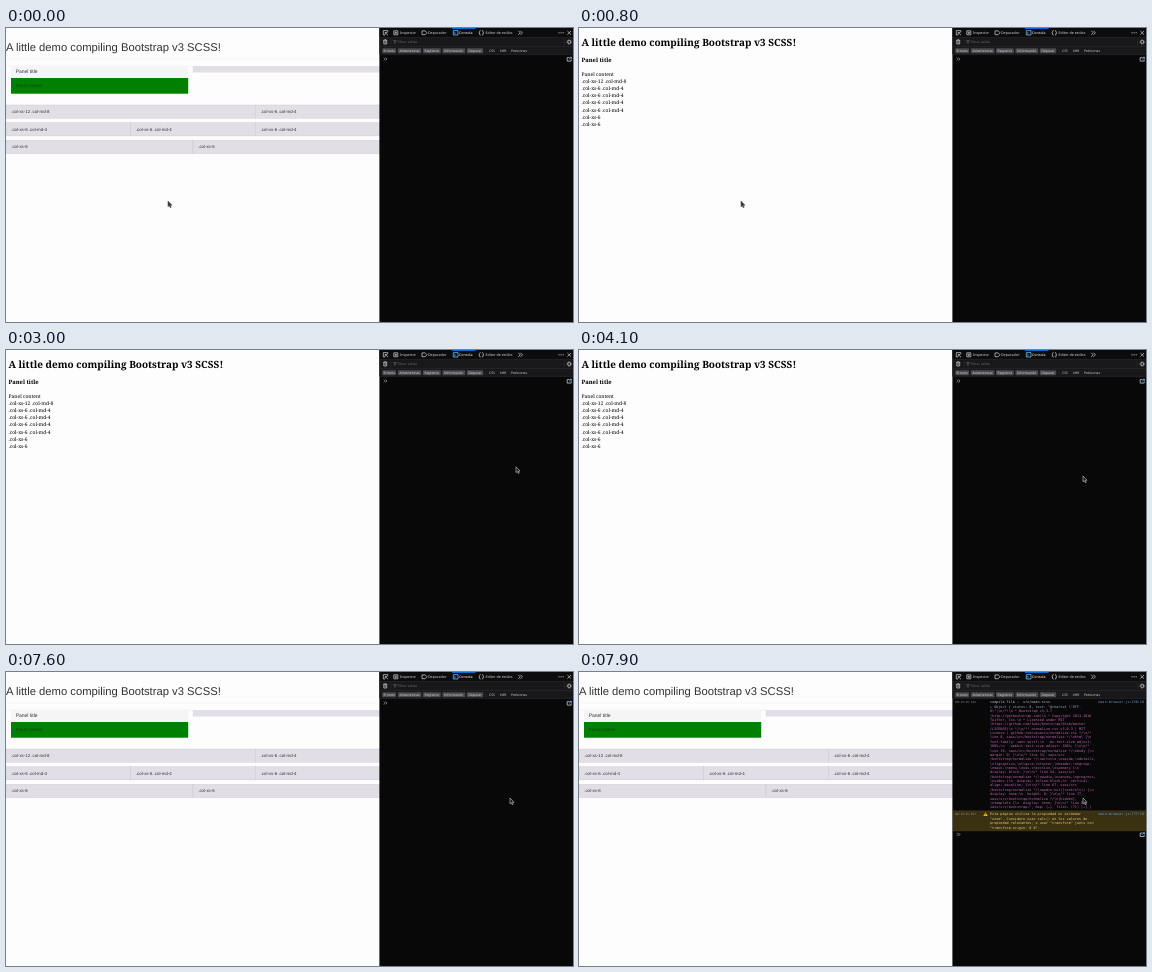
An HTML page that plays this animation: 567 by 294 pixels, repeating every 8000 ms.

```html
<!DOCTYPE html>
<html lang="en">
<head>
<meta charset="utf-8">
<title>SCSS compiling demo</title>
<style>
  html, body { margin: 0; width: 100%; height: 100%; overflow: hidden; background: #fdfdfd; }
  svg { display: block; width: 567px; height: 294px; }
  text { text-rendering: geometricPrecision; white-space: pre; }
  #styled { font: 4.37px "Liberation Sans", Arial, sans-serif; fill: #333; }
  #plain { font: 4.99px "Noto Serif", serif; fill: #000; }
  #tools { font: 3.6px "Noto Sans", sans-serif; fill: #d7d7db; }
  .mono { font: 3.45px "DejaVu Sans Mono", monospace; }
  .stamp { font-size: 2.85px; fill: #939395; }
  .link { fill: #5f9fd8; text-anchor: end; }
  .icon { fill: none; stroke: #c8c8cc; stroke-width: .75; }
  .blue { stroke: #75bfff; }
</style>
</head>
<body>
<svg viewBox="0 0 567 294">
  <rect width="374" height="294" fill="#fdfdfd"/>

  <g id="styled">
    <text x="0" y="22.6" font-size="11.24">A little demo compiling Bootstrap v3 SCSS!</text>
    <path d="M0 31H374" stroke="#eee" stroke-width=".5"/>
    <rect x="187" y="38" width="187" height="6.5" fill="#e1dee6"/>
    <path d="M0 38H187V44.5" fill="none" stroke="#ddd8e2" stroke-width=".4"/>
    <rect x="5" y="38.5" width="177.2" height="11.5" fill="#f5f5f5"/>
    <rect x="5" y="50" width="177.2" height="15.7" fill="#008000"/>
    <text x="9.7" y="45.4" font-size="5">Panel title</text>
    <text x="9.7" y="59.2" fill="#153d15">Panel content</text>
  </g>

  <g id="plain">
    <text x="2.5" y="17.6" font-size="9.98" font-weight="700">A little demo compiling Bootstrap v3 SCSS!</text>
    <text x="2.5" y="34.2" font-size="5.84" font-weight="700">Panel title</text>
  </g>

  <g id="tools">
    <rect x="373.4" width="193.6" height="294" fill="#080809"/>
    <rect x="373.4" width="193.6" height="9.4" fill="#0c0c0d"/>
    <rect x="373.4" y="9.4" width="193.6" height="17.2" fill="#18181a"/>
    <path d="M374 9.4H567M374 18.6H567M374 26.6H567" stroke="#38383d" stroke-width=".4"/>
    <rect x="446" width="23.5" height=".8" fill="#0a84ff"/>

    <g class="icon">
      <path d="M379 7H377.3V2.6H381.8V4.2M379.2 4.4L382 7.2M379.2 4.4V6.6M379.2 4.4H381.4"/>
      <path d="M387.8 2.8H391.8V6.8H387.8ZM389.2 4.2H390.4V5.4H389.2Z"/>
      <path d="M416 2.9H419.2L421 4.8L419.2 6.7H416Z"/>
      <path class="blue" d="M447.3 2.6H452V7H447.3ZM448.3 4.2L449.4 5.2L448.3 6.2"/>
      <path d="M474.6 2.5Q473.6 2.5 473.6 3.6T472.8 4.8Q473.6 4.8 473.6 6T474.6 7.1M476 2.5Q477 2.5 477 3.6T477.8 4.8Q477 4.8 477 6T476 7.1"/>
      <path d="M512.3 2.8L514.2 4.8L512.3 6.8M514.5 2.8L516.4 4.8L514.5 6.8"/>
      <path d="M552.5 4.8H558" stroke-width="1" stroke-dasharray="1 1.1"/>
      <path d="M561.4 3L565 6.6M565 3L561.4 6.6"/>
      <path d="M377.2 12.3H381.2M378.5 11.7H380M377.8 12.3V16H380.7V12.3M379.2 13.2V15.2"/>
      <path d="M387.5 12.5H390.4L389.2 14.2V15.6L388.5 15V14.2Z" stroke="#77777b" stroke-width=".5"/>
      <circle cx="563.2" cy="14" r="1.5"/>
      <circle cx="563.2" cy="14" r="2.2" stroke-width=".7" stroke-dasharray=".85 .88"/>
      <path d="M385 11V17M558.5 11V17M480 20.5V25" stroke="#38383d" stroke-width=".4"/>
    </g>
    <text x="391.5" y="15.2" font-size="3.4" fill="#68686d">Filtrar salida</text>

    <g id="log" class="mono">
      <text class="stamp" x="376.3" y="31.4">00:15:45.342</text>
      <text class="link" x="565" y="31.4">main-browser.js:150:18</text>
      <text x="411" y="31.4" fill="#c8c8cc">compile file :  src/main.scss</text>
      <text x="411" y="35.8" fill="#9ba9d2">▸ Object { status: 0, text: "@charset \"UTF-</text>
    </g>
    <g id="warning" class="mono" fill="#e8d078">
      <rect x="374" y="138.8" width="193" height="20" fill="#3a3012"/>
      <path d="M374 138.8H567M374 158.8H567" stroke="#5b4d20" stroke-width=".4"/>
      <path d="M406.5 140.2L408.7 144.1H404.3Z" fill="#ffbf00"/>
      <path d="M406.5 141.4V142.8M406.5 143.2V143.7" stroke="#332b0b" stroke-width=".5"/>
      <text class="stamp" x="376.3" y="143.4">00:15:45.497</text>
      <text class="link" x="565" y="143.4">main-browser.js:777:10</text>
    </g>
    <g id="prompt" class="icon">
      <path d="M377.8 -1.5L379.2 0L377.8 1.5M379.6 -1.5L381 0L379.6 1.5" stroke-width=".55"/>
      <path d="M563.4 -1.4H561.2V2.1H565.2V.4" stroke="#c3d4e4"/>
      <path class="blue" d="M563 .3L565.3 -1.6M563.8 -1.7H565.5V-.2"/>
    </g>
  </g>

  <path id="cursor" d="M0 0V5.7L1.3 4.6L2.2 6.7L3.2 6.2L2.3 4.2H4Z" stroke-width=".6" stroke-linejoin="round"/>
</svg>

<script>
const LOOP = 8000;
const $ = id => document.getElementById(id);

function add(parent, tag, attrs, content = "") {
  const node = document.createElementNS("http://www.w3.org/2000/svg", tag);
  for (const name in attrs) node.setAttribute(name, attrs[name]);
  node.textContent = content;
  parent.append(node);
}

function addLines(parent, lines, x, y, pitch, attrs = {}) {
  lines.forEach((line, i) => add(parent, "text", { x, y: y + i * pitch, ...attrs }, line));
}

// Page grid: top edge, then [left, right, label] for each cell
const wide = ".col-xs-12 .col-md-8", third = ".col-xs-6 .col-md-4", half = ".col-xs-6";
const rows = [
  [77, [0, 249.4, wide], [249.4, 374, third]],
  [94.7, [0, 124.7, third], [124.7, 249.4, third], [249.4, 374, third]],
  [112.4, [0, 187, half], [187, 374, half]]
];
for (const [y, ...cells] of rows) {
  for (const [left, right, label] of cells) {
    add($("styled"), "rect", {
      x: left, y, width: right - left, height: 13.2,
      fill: "#e1dee6", stroke: "#cbc5d2", "stroke-width": .45
    });
    add($("styled"), "text", { x: left + 5.2, y: y + 8 }, label);
  }
}
const labels = rows.flatMap(([, ...cells]) => cells.map(cell => cell[2]));
addLines($("plain"), ["Panel content", ...labels], 2.5, 47.5, 7.22);

const tabs = [[394, "Inspector"], [422, "Depurador"], [453, "Consola"], [479.5, "Editor de estilos"]];
for (const [x, label] of tabs) {
  add($("tools"), "text", { x, y: 6, fill: label === "Consola" ? "#fff" : "#d7d7db" }, label);
}

const filters = [
  [376.3, 390, "Errores"], [391.8, 415.4, "Advertencias"], [417, 434.8, "Registros"],
  [436.4, 459.2, "Información"], [460.8, 477.2, "Depurar"],
  [482, 490, "CSS"], [492, 502, "XHR"], [503, 523, "Peticiones"]
];
filters.forEach(([left, right, label], i) => {
  if (i < 5) add($("tools"), "rect", {
    x: left, y: 20.3, width: right - left, height: 4.9, rx: .7, fill: "#4a4a4f"
  });
  add($("tools"), "text", {
    x: (left + right) / 2, y: 24, "font-size": 3.35, "text-anchor": "middle"
  }, label);
});

const output = String.raw`8\";\n/*!\n * Bootstrap v3.3.7
(http://getbootstrap.com)\n * Copyright 2011-2016
Twitter, Inc.\n * Licensed under MIT
(https://github.com/twbs/bootstrap/blob/master
/LICENSE)\n */\n/*! normalize.css v3.0.3 | MIT
License | github.com/usuario/normalize.css */\n/*
line 9, sass/src/bootstrap/normalize */\nhtml {\n
font-family: sans-serif;\n  -ms-text-size-adjust:
100%;\n  -webkit-text-size-adjust: 100%; }\n\n/*
line 19, sass/src/bootstrap/normalize */\nbody {\n
margin: 0; }\n\n/* line 33, sass/src
/bootstrap/normalize */\narticle,\naside,\ndetails,
\nfigcaption,\nfigure,\nfooter,\nheader,\nhgroup,
\nmain,\nmenu,\nnav,\nsection,\nsummary {\n
display: block; }\n\n/* line 54, sass/src
/bootstrap/normalize */\naudio,\ncanvas,\nprogress,
\nvideo {\n  display: inline-block;\n  vertical-
align: baseline; }\n\n/* line 67, sass/src
/bootstrap/normalize */\naudio:not([controls]) {\n
display: none;\n  height: 0; }\n\n/* line 77,
sass/src/bootstrap/normalize */\n[hidden],
\ntemplate {\n  display: none; }\n\n/* line 87,
sass/src/bootstrap…", map: {…}, files: (71) […] }`.split("\n");
addLines($("log"), output, 411, 40.17, 4.37, { fill: "#c565b5" });

addLines($("warning"), [
  "Esta página utiliza la propiedad no estándar",
  '"zoom". Considere usar calc() en los valores de',
  'propiedad relevantes, o usar "transform" junto con',
  '"transform-origin: 0 0".'
], 411, 143.4, 4.37);

// Pointer moves: start, end, target x, target y
const moves = [[2000, 2500, 510, 115], [2900, 3200, 510, 122], [3300, 3600, 504, 126]];

function pointerAt(t) {
  let x = 162, y = 173;
  for (const [start, end, toX, toY] of moves) {
    const p = Math.min(1, Math.max(0, (t - start) / (end - start)));
    const eased = p * p * (3 - 2 * p);
    x += (toX - x) * eased;
    y += (toY - y) * eased;
  }
  return [x, y];
}

const show = (id, on) => $(id).style.display = on ? "" : "none";

function draw(now) {
  const t = Math.floor(now % LOOP / 100) * 100;
  const styled = t < 100 || t >= 7600;
  const logged = t >= 7700, warned = t >= 7800;
  show("styled", styled);
  show("plain", !styled);
  show("log", logged);
  show("warning", warned);
  $("prompt").setAttribute("transform", `translate(0 ${warned ? 162.4 : logged ? 142.6 : 31})`);

  const [x, y] = pointerAt(t), dark = x > 374;
  $("cursor").setAttribute("transform", `translate(${x} ${y})`);
  $("cursor").setAttribute("fill", dark ? "#111" : "#333");
  $("cursor").setAttribute("stroke", dark ? "#d0d0d0" : "#555");
}

const startTime = performance.now();
function tick() {
  draw(performance.now() - startTime);
  requestAnimationFrame(tick);
}
tick();
</script>
</body>
</html>
```
